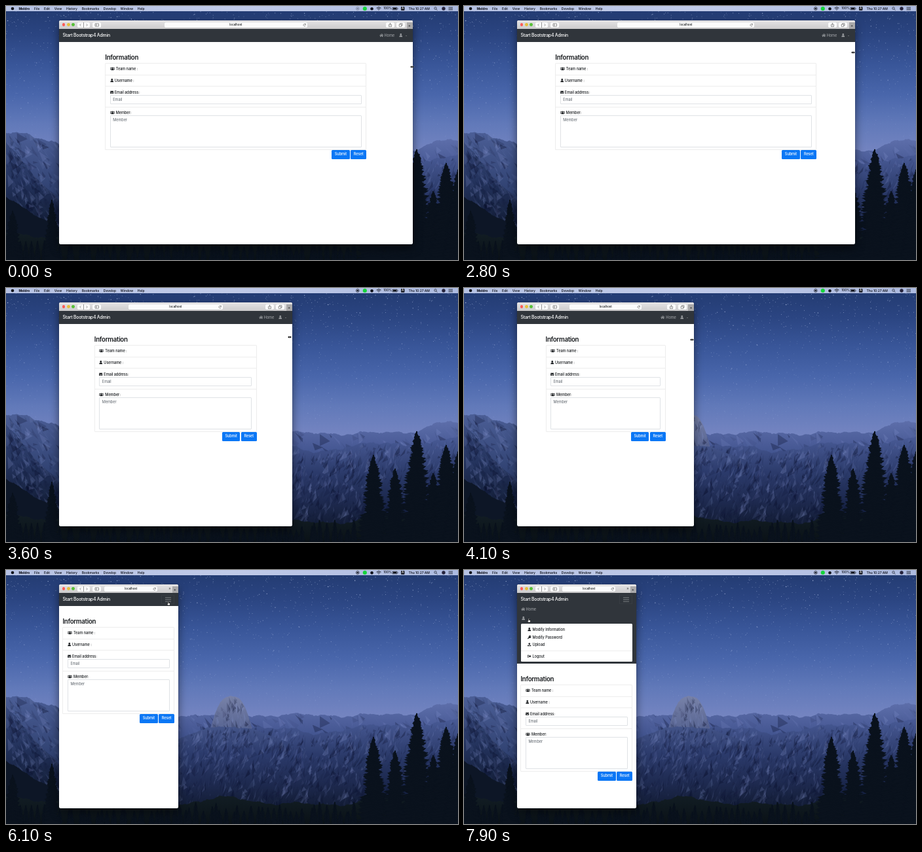
These frames come from a looping animation (690 by 388 pixels, 8 s). An HTML page with a canvas:

```html
<!DOCTYPE html>
<html lang="en">
<head>
<meta charset="utf-8">
<title>Responsive admin form</title>
<style>
html, body { margin: 0; width: 100%; height: 100%; overflow: hidden; background: #1c3565; }
#stage { position: relative; width: 690px; height: 388px; overflow: hidden; font: 500 5.6px Inter, "Noto Sans", sans-serif; letter-spacing: -.07px; color: #16191c; }
#stage div, #stage svg, #stage span, canvas { position: absolute; box-sizing: border-box; }
#stage span { line-height: 0; height: 0; white-space: nowrap; }
#stage svg { overflow: visible; }
.i { width: 5.5px; height: 5.5px; margin-top: -2.8px; fill: currentColor; }
#menu { left: 0; top: 0; width: 690px; height: 8px; background: linear-gradient(90deg, #b6c2e3, #c0cae8 50%, #adbbe0); font-size: 5px; letter-spacing: -.04px; color: #080a12; }
#menu #apps { left: 19.5px; top: 4px; display: flex; gap: 6.7px; }
#apps span { position: static; }
#apps :first-child { font-weight: 700; }
#win { left: 81px; top: 21.5px; height: 342.5px; border-radius: 2.5px; box-shadow: 0 0 1px rgba(0,0,0,.5), 0 6px 14px rgba(0,0,0,.5); }
#clip { inset: 0; border-radius: 2.5px; overflow: hidden; background: #fff; }
#bar { left: 0; right: 0; top: 0; height: 13.5px; background: linear-gradient(#e6e5e6, #cccbcc); }
.light { width: 4.8px; height: 4.8px; top: 4.3px; border-radius: 50%; }
.btn { top: 3px; height: 8px; border-radius: 1.5px; background: #fbfbfb; box-shadow: 0 .3px .5px rgba(0,0,0,.3); }
.btn svg { inset: 0; width: 100%; height: 100%; fill: none; stroke: #555; stroke-width: .6; }
#plus { right: 0; top: 3.5px; width: 9px; height: 10px; background: #aaa9aa; }
#nav { left: 0; right: 0; top: 13.5px; overflow: hidden; background: #30353b; color: #9a9da0; }
#brand { left: 5.5px; top: 10px; font-size: 6.9px; letter-spacing: -.22px; color: #fff; }
.caret { border: 1.5px solid transparent; border-top-color: currentColor; border-bottom: 0; }
#burger { right: 5.5px; top: 3px; width: 20px; height: 14.3px; box-shadow: inset 0 0 0 .5px rgba(255,255,255,.07); border-radius: 1.5px; }
#burger svg { left: 5.5px; top: 3px; width: 9px; height: 8px; stroke: #9a9da0; stroke-width: .7; }
#drop { left: 5.5px; right: 5.5px; top: 47px; height: 58px; background: #fff; border-radius: 1.5px; color: #16191c; }
#page { left: 0; right: 0; height: 309px; }
#title { left: 0; top: 24px; font-size: 9.7px; font-weight: 600; letter-spacing: -.3px; }
#card { left: 0; right: 0; top: 32px; height: 133px; box-shadow: inset 0 0 0 1px #ededed; border-radius: 1.5px; }
.rule { left: 0; right: 0; height: 1px; background: #ededed; }
.field { left: 7.5px; right: 7.5px; box-shadow: inset 0 0 0 1px #dfe2e5; border-radius: 1.5px; color: #596068; font-weight: 400; }
.blue { top: 165px; height: 13.5px; line-height: 13.5px; text-align: center; background: #0b77f5; border-radius: 1.5px; color: #fff; }
</style>
</head>
<body>
<svg width="0" height="0" style="position:absolute">
  <symbol id="user" viewBox="0 0 16 16"><circle cx="8" cy="4" r="4"/><path d="M1 16v-2a5 5 0 0 1 5-5h4a5 5 0 0 1 5 5v2z"/></symbol>
  <symbol id="team" viewBox="0 0 20 16"><circle cx="10" cy="5" r="3.5"/><circle cx="3" cy="4.5" r="2.2"/><circle cx="17" cy="4.5" r="2.2"/><path d="M4 15v-2q0-4 6-4t6 4v2zM0 11q0-4 4-4l1 1Q3 10 3 12H0zM20 11q0-4-4-4l-1 1q2 2 2 4h3z"/></symbol>
  <symbol id="mail" viewBox="0 0 16 16"><path d="M0 4q0-2 2-2h12q2 0 2 2l-8 6zM0 6l8 6 8-6v6q0 2-2 2H2q-2 0-2-2z"/></symbol>
  <symbol id="key" viewBox="0 0 16 16"><path fill-rule="evenodd" d="M10.5 0a5.500 5.500 0 1 1-2 10.600L7 12H5v2H3v2H0v-3l5.400-5.500A5.500 5.500 0 0 1 10.500 0zm1 3a1.500 1.500 0 1 0 .1 0z"/></symbol>
  <symbol id="upload" viewBox="0 0 16 16"><path d="M8 0l5 6h-3v5H6V6H3zM0 11h5v2h6v-2h5v5H0z"/></symbol>
  <symbol id="exit" viewBox="0 0 16 16"><path d="M6 2v2H2v8h4v2H1q-1 0-1-1V3q0-1 1-1zM10 2l6 6-6 6v-4H5V6h5z"/></symbol>
  <symbol id="home" viewBox="0 0 18 16"><path d="M9 1l9 8-1 1-8-7-8 7-1-1zM9 5l6 5v5h-4v-4H7v4H3v-5zM13 2h2v4l-2-2z"/></symbol>
</svg>
<div id="stage">
  <canvas id="scene" width="690" height="388"></canvas>
  <div id="menu">
    <div id="apps"></div>
    <svg width="690" height="8" fill="none" stroke="#10131c" stroke-width=".7">
      <g fill="#10131c" stroke="none">
        <circle cx="10" cy="4" r="2.3"/><circle cx="558.5" cy="4.2" r="2.3"/><rect x="603" y="1.3" width="5.4" height="5.4" rx=".8"/>
        <circle cx="547.8" cy="4" r="3.1" fill="#14d43a"/><circle cx="668" cy="4" r="2.7" fill="#25233c"/>
      </g>
      <g id="rec"><circle cx="536.800" cy="4" r="2.4"/><path d="M535.7 4h2.2" stroke-width="2.2"/></g>
      <path d="M565.5 3.200q3.500-3 7 0M566.800 4.600q2.200-1.800 4.400 0M568.300 5.900h1.400" stroke-width=".9"/>
      <path d="M590 2.300h7v3.500h-7zM598 3.300v1.500"/><path d="M591 4h5" stroke-width="2.2"/>
      <circle cx="655.5" cy="3.500" r="1.7"/><path d="M656.7 4.800l1.800 1.800"/>
      <path d="M675.5 2.200h6.500M675.500 4h6.500M675.500 5.800h6.500"/>
    </svg>
    <span style="left:576.5px;top:4px;font-size:4.6px">100%</span>
    <span style="left:604px;top:4px;font-size:4.5px;color:#fff">A</span>
    <span style="left:614.5px;top:4px">Thu 10:27 AM</span>
  </div>
  <div id="win"><div id="clip">
    <div id="bar">
      <div class="light" style="left:4.6px;background:#fc5b57"></div>
      <div class="light" style="left:11.8px;background:#e5bf3c"></div>
      <div class="light" style="left:19px;background:#57c038"></div>
      <div class="btn" style="left:28px;width:19px"><svg><path d="M5.5 2.200L3.700 4l1.800 1.800M13.500 2.200L15.300 4l-1.800 1.800M9.500 0v8"/></svg></div>
      <div class="btn" style="left:50.5px;width:13.5px"><svg><path d="M4 2h5.500v4H4zM6 2v4"/></svg></div>
      <div class="btn" id="url"><span style="left:50%;top:4px;transform:translateX(-50%);font-size:4.5px">localhost</span><svg style="left:auto;right:2px;width:5px"><path d="M4.2 3.200A1.700 1.700 0 1 0 4.300 4.700M4.400 1.800v1.500H3"/></svg></div>
      <div class="btn" id="share" style="width:13px"><svg><path d="M5.5 3.200h-1v3.300h4V3.200h-1M6.500 5V1.300M5.400 2.300l1.100-1 1.100 1"/></svg></div>
      <div class="btn" id="tabs" style="width:13px;right:11.5px"><svg><path d="M4.2 3h3.500v3.300H4.200zM5.500 3V1.700H9V5H7.700"/></svg></div>
      <span id="more" style="right:11px;top:6.5px;color:#555">»</span>
      <div id="plus"><span style="left:2.5px;top:5px">+</span></div>
    </div>
    <div id="nav"><span id="brand">Start Bootstrap4 Admin</span>
      <div id="links"></div>
      <div id="burger"><svg><path d="M0 1.200h9M0 4.200h9M0 7.200h9"/></svg></div>
      <div id="drop"></div>
    </div>
    <div id="page"><div id="form">
      <span id="title">Information</span>
      <div id="card"></div>
      <div class="blue" style="right:25.5px;width:27.5px">Submit</div>
      <div class="blue" style="right:0;width:24px">Reset</div>
    </div></div>
  </div></div>
  <svg id="cursor" width="1" height="1" stroke-linejoin="round"></svg>
</div>
<script>
const $ = id => document.getElementById(id);
const text = (x, y, s) => `<span style="left:${x}px;top:${y}px">${s}</span>`;
const icon = (x, y, name, w = 5.5) => `<svg class="i" style="left:${x}px;top:${y}px;width:${w}px"><use href="#${name}"/></svg>`;
const rule = y => `<div class="rule" style="top:${y}px"></div>`;
const field = (y, h, s) => `<div class="field" style="top:${y}px;height:${h}px">${text(4.5, 7, s)}</div>`;

$('apps').innerHTML = 'Meldro File Edit View History Bookmarks Develop Window Help'.split(' ').map(s => `<span>${s}</span>`).join('');

// Form rows are a label, plus an input when it has a height
let rowY = 0;
for (const [name, label, input] of [['team', 'Team name :'], ['user', 'Username :'], ['mail', 'Email address:', 14], ['team', 'Member:', 48.5]]) {
  const wide = name === 'team';
  $('card').innerHTML += (rowY ? rule(rowY) : '') + icon(7.5, rowY + 9.2, name, wide ? 7 : 5.5) + text(wide ? 16.5 : 14.5, rowY + 9.2, label) +
    (input ? field(rowY + 13.5, input, label.match(/\w+/)[0]) : '');
  rowY += input ? input + 17.3 : 17.7;
}
const items = [['user', 'Modify Information'], ['key', 'Modify Password'], ['upload', 'Upload'], ['exit', 'Logout']];
$('drop').innerHTML = items.map(([name, s], i) => {
  const y = 9 + 11.5 * i + (name === 'exit' ? 6 : 0);
  return icon(10, y, name) + text(18, y, s);
}).join('') + rule(40.5);

// Night valley
const g = $('scene').getContext('2d');
let seed = 7;
const rnd = () => (seed = seed * 16807 % 2147483647) / 2147483647;
const fade = (y0, y1, ...colors) => {
  const f = g.createLinearGradient(0, y0, 0, y1);
  colors.forEach((c, i) => f.addColorStop(i / (colors.length - 1), c));
  return f;
};
const bumps = x => Math.sin(x / 19) + .6 * Math.sin(x / 8.3 + 2) + .4 * Math.sin(x / 3.1);
const bell = (x, mid, w) => Math.exp(-(((x - mid) / w) ** 2));

// A skyline y(x) filled down, with light and dark facets inside
function ridge(x0, x1, y, fill, facets = 0, lean = 1) {
  g.save();
  g.beginPath();
  g.moveTo(x0, 388);
  for (let x = x0; x <= x1; x += 2) g.lineTo(x, y(x) + rnd() * 1.5);
  g.lineTo(x1, 388);
  g.fillStyle = fill;
  g.fill();
  g.clip();
  for (let i = 0; i < facets; i++) {
    const x = x0 + rnd() * (x1 - x0), top = y(x) + rnd() ** 1.3 * 115, h = 4 + rnd() * 16, w = 1 + rnd() * 5;
    g.fillStyle = rnd() < .45 ? `rgba(140,155,212,${rnd() * .22})` : `rgba(9,15,44,${rnd() * .35})`;
    g.beginPath();
    g.moveTo(x, top);
    g.lineTo(x + lean * h * rnd() + w, top + h * .6);
    g.lineTo(x + lean * h * rnd(), top + h);
    g.fill();
  }
  g.restore();
}
function tree(x, top, base, half) {
  g.fillStyle = '#0a121d';
  g.fillRect(x - 1, top - 2, 2, base - top);
  for (let y = top; y < base; y += 1.6) {
    const w = half * ((y - top) / (base - top)) ** .6;
    for (const side of [-1, 1]) {
      const reach = side * (1 + w * (.5 + rnd() * .6));
      g.beginPath();
      g.moveTo(x, y - 3);
      g.lineTo(x + reach, y + rnd() * 4 - 1);
      g.lineTo(x + reach * .7, y + 4);
      g.lineTo(x, y + 4);
      g.fill();
    }
  }
}
g.fillStyle = fade(0, 225, '#223a70', '#2b4582', '#395699', '#4966ab', '#6179b9', '#7585c1');
g.fillRect(0, 0, 690, 388);
for (let i = 0; i < 1500; i++) {
  const y = 8 + 200 * rnd() ** 1.2, s = rnd() < .1 ? 1.2 : .8;
  g.fillStyle = `rgba(215,226,255,${(.15 + rnd() * .7) * (1 - y / 250)})`;
  g.fillRect(rnd() * 690, y, s, s);
}
ridge(0, 690, x => 221 - 17 * bell(x, 672, 40) + 2 * bumps(x), fade(200, 270, '#5f70ac', '#394b86'), 500);
ridge(0, 240, x => 192 + .4 * Math.max(0, x - 30) + 2 * bumps(x), fade(190, 310, '#4c5f97', '#283966'), 400, .8);
ridge(370, 690, x => 238 + 12 * bell(x, 470, 40) - 9 * bell(x, 690, 40) + 2.5 * bumps(x), fade(225, 345, '#4a5c98', '#2a3968', '#141f3f'), 1000, -.7);
ridge(309, 379, x => 192 + 60 * Math.abs((x - 344) / 34) ** 2.6, fade(192, 260, '#7882a8', '#4d5b8b'), 200, .1);
ridge(200, 570, x => Math.max(228 + .38 * Math.abs(x - 340), 240 + .8 * bumps(x)), fade(235, 370, '#46578c', '#2c3b6c', '#1e2a50', '#10192f'), 1500, -.6);
ridge(0, 110, x => 206 + 1.15 * x + 2 * bumps(x), fade(205, 340, '#3a4c7f', '#22315a', '#111b33'), 500, .6);
ridge(0, 130, x => 290 + .6 * x + 2 * bumps(x), '#0d1626');
ridge(0, 690, x => 357 - 10 * bell(x, 340, 50) - 12 * bell(x, 0, 60) - 12 * bell(x, 640, 80) + 2 * bumps(x), fade(345, 388, '#121d24', '#0a1116'));
for (let x = 0; x < 560; x += 9) tree(x + rnd() * 9, 356 + rnd() * 16, 388, 5);
for (const [x, top, half] of [[70, 298, 13], [10, 315, 16], [561, 257, 25], [594, 278, 22], [627, 221, 30], [652, 285, 22], [672, 242, 27], [690, 252, 22]]) tree(x, top, 386, half);

// Motion
const clamp = v => Math.min(1, Math.max(0, v));
const ease = (t, a, b) => { const p = clamp((t - a) / (b - a)); return p * p * (3 - 2 * p); };
const dragged = t => 1 - (1 - clamp((t - 2600) / 3300) ** 1.4) ** 3.46;

const shapes = {
  resize: '<path d="M-2.800 0L-.7-1.700V-.5H.7V-1.700L2.800 0 .7 1.700V.5H-.7V1.700Z" stroke="#fff" stroke-width=".5" paint-order="stroke"/>',
  arrow: '<path d="M-1.300-3V2.400L0 1.200.8 3l.9-.4L.9.900H2.500Z" stroke="#fff" stroke-width=".5" paint-order="stroke"/>',
  hand: '<path d="M-.9-2.600q.7-.7 1.200 0V-.6l1.900.5q.6.300.4 1.100L2 2.900H-.8L-2.300.8q-.2-.7.500-.6l.9.600Z" fill="#fff" stroke="#000" stroke-width=".6"/>'
};
const shapeAt = t => t > 7000 || t > 5800 && t < 6700 ? 'hand' : t > 5400 || t > 900 && t < 2100 ? 'arrow' : 'resize';

// Fixed container widths, in page pixels at the browser's zoom
const zoom = .3594;
const containers = [[1200, 1140], [992, 960], [768, 720], [576, 540]];
function cardWidth(w) {
  const fit = containers.find(([min]) => w >= min * zoom);
  return (fit ? fit[1] * zoom : w) - 30 * zoom;
}
const show = (id, on) => $(id).style.display = on ? '' : 'none';
const px = (id, props) => { for (const p in props) $(id).style[p] = props[p] + 'px'; };

let wideNav, shape;
function setLinks(wide) {
  if (wide === wideNav) return;
  wideNav = wide;
  const [hx, hy, ux, uy] = wide ? [-51, 10, -21, 10] : [5.5, 25, 6.5, 39];
  $('links').innerHTML = icon(hx, hy, 'home', 6.5) + text(hx + 8, hy, 'Home') + icon(ux, uy, 'user') +
    `<div class="caret" style="left:${ux + 10}px;top:${uy - .5}px"></div>`;
}
const start = performance.now();
function draw() {
  const t = Math.floor((performance.now() - start) % 8000 / 100) * 100;
  const w = 539.5 - 358 * dragged(t);
  const dropped = t >= 7400, open = dropped ? 88 : 29 * ease(t, 6400, 6800);
  const wide = w >= 576 * zoom, roomy = w > 225;
  const card = cardWidth(w), url = Math.max(81.3, w * .405);

  px('win', { width: w });
  px('url', { width: url, left: Math.max(69, (w - url) / 2) });
  px('share', { right: roomy ? 28 : 18.5 });
  show('share', w > 190);
  show('tabs', roomy);
  show('more', !roomy);

  px('nav', { height: 20 + open });
  setLinks(wide);
  px('links', { left: wide ? w : 0 });
  show('links', wide || open > 0);
  show('burger', !wide);
  show('drop', dropped);
  px('page', { top: 33.5 + open });
  px('form', { width: card, left: (w - card) / 2 });

  $('rec').style.opacity = t < 500 ? .35 : 1;
  const toBurger = ease(t, 5400, 6000), toUser = ease(t, 6600, 7200);
  px('cursor', {
    left: 80.5 + w - 3 * ease(t, 2300, 3000) - 11.5 * toBurger - 148.5 * toUser,
    top: 92.5 - 33.5 * ease(t, 0, 1800) + 12 * ease(t, 1800, 2700) + 12 * ease(t, 2700, 4900) - 32 * toBurger + 26 * toUser
  });
  if (shapeAt(t) !== shape) $('cursor').innerHTML = shapes[shape = shapeAt(t)];
  requestAnimationFrame(draw);
}
draw();
</script>
</body>
</html>
```
